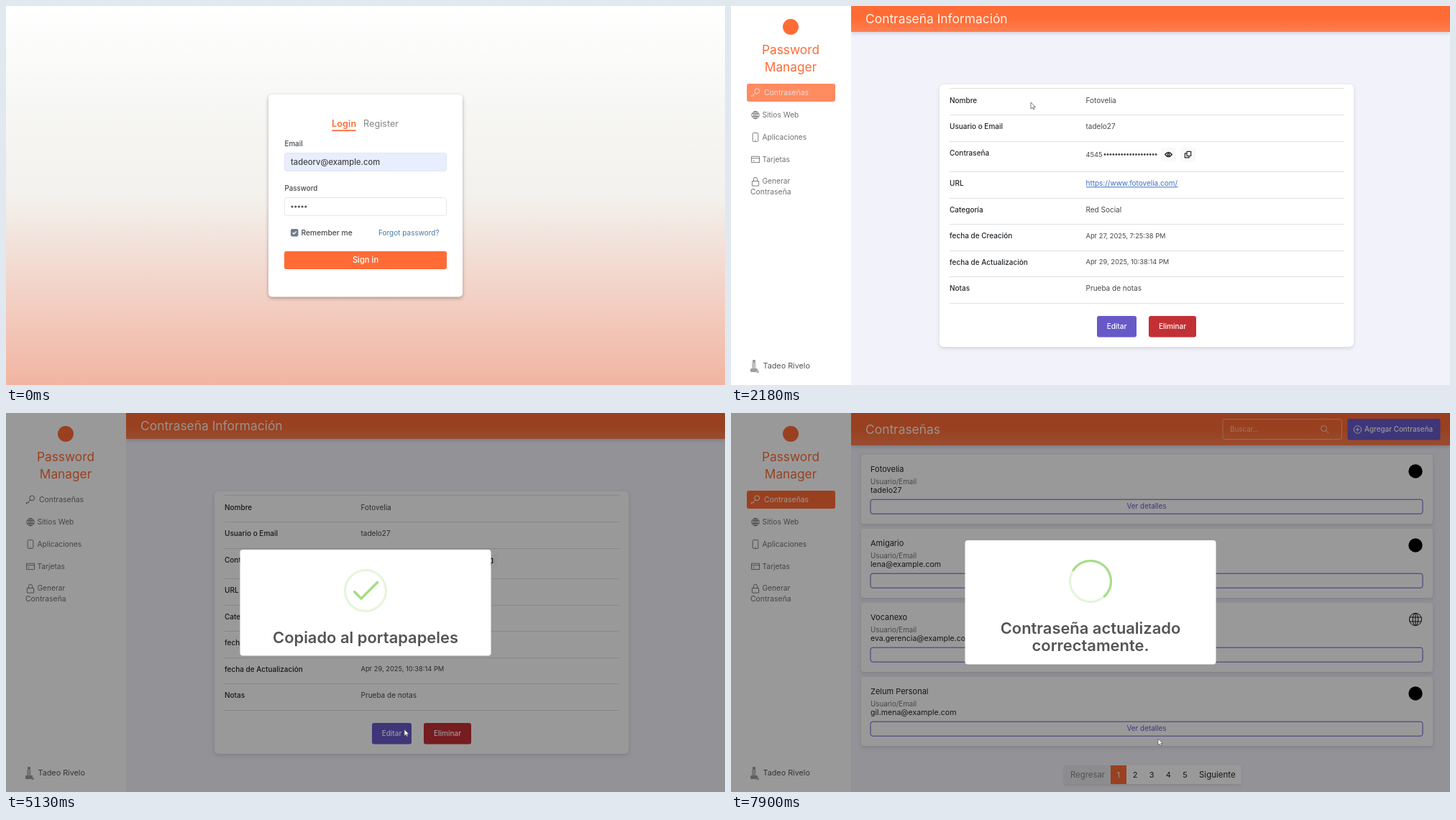
An HTML page with a canvas for the animation above (7990 ms loop, 1000 by 527 pixels).

```html
<!DOCTYPE html>
<html lang="es">
<head>
<meta charset="utf-8">
<title>Password Manager</title>
<style>
  html, body { margin: 0; width: 100%; height: 100%; overflow: hidden; background: #fff; }
  canvas { display: block; width: 100vw; height: 100vh; }
</style>
</head>
<body>
<canvas id="stage"></canvas>
<script>
const W = 1000, H = 527, LOOP = 7990;
const ORANGE = '#ff6b35', PURPLE = '#6759c8', RED = '#c23035', PAGE = '#f2f2fb';
const INK = '#212529', TEXT = '#45484d', MUTED = '#707070', GREEN = '165,220,134';

const SITE = 'Fotovelia', URL_TEXT = 'https://www.fotovelia.com/', USER = 'tadelo27';
const ACCOUNTS = [
  [SITE, USER],
  ['Amigario', 'lena@example.com'],
  ['Vocanexo', 'eva.gerencia@example.com'],
  ['Zelum Personal', 'gil.mena@example.com']
];

// Moments of the story, in ms
const AT = {
  cursor: 60, home: 710, loaded: 830, detail: 2090, reveal: 2940,
  copied: 4460, copiedEnd: 5290, edit: 5780, back: 7300, reloaded: 7390, saved: 7540
};

// Pointer stops: time, x, y
const STOPS = [
  [60, 520, 400], [400, 482, 345], [900, 482, 345], [1650, 417, 134], [2220, 417, 134],
  [2800, 608, 206], [3750, 608, 206], [4260, 671, 200], [4560, 671, 200], [5080, 554, 440],
  [5850, 554, 440], [6290, 546, 376], [6400, 546, 376], [7000, 594, 453]
];

const canvas = document.getElementById('stage');
const ctx = canvas.getContext('2d');
const dpr = window.devicePixelRatio || 1;
canvas.width = W * dpr;
canvas.height = H * dpr;

const clamp = v => Math.max(0, Math.min(1, v));
const ramp = (t, start, length) => clamp((t - start) / length);
const smooth = k => k * k * (3 - 2 * k);
const mix = (a, b, k) => a + (b - a) * k;

function box(x, y, w, h, r, fill, stroke, line = 1) {
  ctx.beginPath();
  ctx.roundRect(x, y, w, h, r);
  if (fill) { ctx.fillStyle = fill; ctx.fill(); }
  if (stroke) { ctx.strokeStyle = stroke; ctx.lineWidth = line; ctx.stroke(); }
}

function panel(x, y, w, h, r, shade = 'rgba(0,0,0,.13)', blur = 5) {
  ctx.save();
  ctx.shadowColor = shade;
  ctx.shadowBlur = blur * dpr;
  ctx.shadowOffsetY = 2 * dpr;
  box(x, y, w, h, r, '#fff');
  ctx.restore();
}

// y is the middle of the line of text
function text(str, x, y, size, color = TEXT, weight = 400, align = 'left') {
  ctx.font = `${weight} ${size}px Inter, "Noto Sans", sans-serif`;
  ctx.textAlign = align;
  ctx.fillStyle = color;
  ctx.fillText(str, x, y + size * 0.35);
}

function disc(x, y, r, fill) {
  ctx.beginPath();
  ctx.arc(x, y, r, 0, 7);
  ctx.fillStyle = fill;
  ctx.fill();
}

function dots(x, y, count, step, r, fill) {
  for (let i = 0; i < count; i++) disc(x + i * step, y, r, fill);
}

function button(x, y, w, h, label, fill, size = 10) {
  box(x, y, w, h, 3, fill);
  text(label, x + w / 2, y + h / 2, size, '#fff', 500, 'center');
}

function rule(x1, x2, y, color) {
  ctx.fillStyle = color;
  ctx.fillRect(x1, y, x2 - x1, 1);
}

function shade(height, ...stops) {
  const fill = ctx.createLinearGradient(0, 0, 0, height);
  stops.forEach(([at, color]) => fill.addColorStop(at, color));
  return fill;
}

const circlePath = (x, y, r, ry = r) =>
  `M${x - r} ${y}a${r} ${ry} 0 1 0 ${2 * r} 0a${r} ${ry} 0 1 0 ${-2 * r} 0`;

const ICONS = {
  key: circlePath(2.2, -2.2, 3.4) + 'M0 .4L-5.5 5.6V3.6M-3.4 3.6L-1.9 5',
  globe: circlePath(0, 0, 5.2) + circlePath(0, 0, 2.3, 5.2) + 'M-5 -1.8H5M-5 1.8H5M0 -5.2V5.2',
  phone: 'M-2.6 -6H2.6Q3.8 -6 3.8 -4.8V4.8Q3.8 6 2.6 6H-2.6Q-3.8 6 -3.8 4.8V-4.8Q-3.8 -6 -2.6 -6ZM-.7 4.2H.7',
  card: 'M-5.5 -4.2H5.5V4.2H-5.5ZM-5.5 -1.6H5.5M-3.6 1.8H-1.4',
  lock: 'M-4.6 -.8H4.6V5.8H-4.6ZM-2.6 -.8V-3.4A2.6 2.6 0 0 1 2.6 -3.4V-.8',
  search: circlePath(-1, -1, 4) + 'M2 2L5.5 5.5',
  plus: circlePath(0, 0, 5.2) + 'M-2.5 0H2.5M0 -2.5V2.5',
  eye: 'M-4.8 0Q0 -6.4 4.8 0Q0 6.4 -4.8 0Z' + circlePath(0, 0, 1.5),
  slash: 'M-4.5 -4L4.5 4',
  copy: 'M-1.5 -4.2H4.2V2H-1.5ZM-1.5 -1.6H-4.2V4.4H1.6V2',
  chevron: 'M-3.5 -1.8L0 1.8L3.5 -1.8',
  tick: 'M-2.6 0L-.8 1.8L2.6 -1.8',
  grip: 'M-2.5 2.5L2.5 -2.5M.3 2.5L2.5 .3'
};

function icon(name, x, y, color, line = 1, scale = 1) {
  ctx.save();
  ctx.translate(x, y);
  ctx.scale(scale, scale);
  ctx.strokeStyle = color;
  ctx.lineWidth = line;
  ctx.lineJoin = 'round';
  ctx.stroke(new Path2D(ICONS[name]));
  ctx.restore();
}

function pointerAt(t) {
  const next = STOPS.findIndex(s => s[0] > t);
  if (next < 0) return STOPS[STOPS.length - 1].slice(1);
  if (next === 0) return STOPS[0].slice(1);
  const a = STOPS[next - 1], b = STOPS[next];
  const k = smooth(ramp(t, a[0], b[0] - a[0]));
  return [mix(a[1], b[1], k), mix(a[2], b[2], k)];
}

let mouse = [0, 0], hot = false, covered = false;

function hover(x, y, w, h) {
  const on = !covered && mouse[0] >= x && mouse[0] <= x + w && mouse[1] >= y && mouse[1] <= y + h;
  if (on) hot = true;
  return on;
}

function login() {
  ctx.fillStyle = shade(H, [0, '#fff'], [0.25, '#f7f7f5'], [0.5, '#f3f1ed'], [1, '#f2b4a1']);
  ctx.fillRect(0, 0, W, H);

  panel(365, 123, 270, 281.5, 5, 'rgba(70,50,60,.4)', 5);
  text('Login', 453, 164, 12.8, ORANGE, 600);
  ctx.fillStyle = ORANGE;
  ctx.fillRect(453.5, 172.3, 33, 1.8);
  text('Register', 497, 164, 12.7, '#858585');

  text('Email', 387.5, 191.5, 9.8, TEXT, 500);
  box(387.5, 204.5, 225, 25, 3, '#e8eefe', '#dfe5f3');
  text('tadeorv@example.com', 396, 217, 11.2, '#444', 500);

  text('Password', 387.5, 253.5, 9.8, TEXT, 500);
  box(387.5, 266.5, 225, 25, 3, '#fff', '#e6e7ea');
  dots(398, 279, 5, 4.7, 1.6, '#555');

  box(396, 310, 10.5, 10.5, 2, '#6c7c90');
  icon('tick', 401.2, 315.2, '#fff', 1.3);
  text('Remember me', 410.5, 315.5, 10.3, TEXT, 500);
  text('Forgot password?', 518, 315.5, 10, '#4a78a6');

  hover(387, 341, 226, 25);
  button(387, 341, 226, 25, 'Sign in', ORANGE, 11.2);
}

function avatar() {
  box(30, 492, 4, 4, 1, '#9a9aa2');
  box(29, 496, 5.5, 10, 0, '#c4c0c4');
  box(27, 504, 10, 5, 1, '#a09da3');
  box(35, 507, 4, 3, 1, '#b5b3b9');
}

function shell(title, barHeight, active, named) {
  ctx.fillStyle = PAGE;
  ctx.fillRect(0, 0, W, H);
  ctx.save();
  ctx.shadowColor = 'rgba(90,90,120,.25)';
  ctx.shadowBlur = 5 * dpr;
  ctx.shadowOffsetY = 2 * dpr;
  ctx.fillStyle = shade(barHeight, [0, ORANGE], [0.5, ORANGE], [1, '#ff7f51']);
  ctx.fillRect(167, 0, W - 167, barHeight);
  ctx.restore();
  text(title, 187, barHeight > 40 ? 23 : 18, 17.4, '#fff3ec');

  ctx.fillStyle = '#fff';
  ctx.fillRect(0, 0, 167, H);
  disc(83, 29, 11, ORANGE);
  text('Password', 83, 60.5, 17.3, ORANGE, 400, 'center');
  text('Manager', 83, 85, 17.3, ORANGE, 400, 'center');

  if (active > 0) {
    ctx.globalAlpha = active;
    box(22, 108, 123, 25, 3, ORANGE);
    ctx.globalAlpha = 1;
  }
  const level = Math.round(mix(112, 255, active));
  const tone = `rgb(${level},${level},${level})`;
  icon('key', 34, 120.5, tone);
  text('Contraseñas', 46, 120.5, 10.4, tone);
  [['globe', 'Sitios Web'], ['phone', 'Aplicaciones'], ['card', 'Tarjetas'], ['lock', 'Generar']]
    .forEach(([glyph, label], i) => {
      const y = 151.2 + i * 30.9;
      icon(glyph, 34, y + 0.4, '#6a6a6a', 0.85);
      text(label, 43.5, y, 10.2, MUTED);
    });
  text('Contraseña', 27, 258.5, 10.4, MUTED);

  avatar();
  if (named) text('Tadeo Rivelo', 44.5, 500.5, 10.8, '#555');
}

function pager(left, pages) {
  const width = pages ? 247 : 134, first = pages ? 65 : 67;
  panel(left, 490, width, 26, 3, 'rgba(0,0,0,.08)', 3);
  box(left, 490, first, 26, [3, 0, 0, 3], '#e8e9ee');
  text('Regresar', left + first / 2 + 0.5, 503.3, 11.4, '#85878c', 400, 'center');
  if (pages) {
    ctx.fillStyle = ORANGE;
    ctx.fillRect(left + first, 490, 22, 26);
  }
  for (let i = 0; i < pages; i++) {
    text(String(i + 1), left + 75.8 + i * 23.2, 503.3, 11, i ? INK : '#fff', 400, 'center');
  }
  text('Siguiente', left + width - 33.7, 503.3, 11.5, INK, 400, 'center');
}

function list(active, loaded, named) {
  shell('Contraseñas', 45, active, named);
  box(684, 8.5, 165.5, 28, 3, null, 'rgba(255,255,255,.45)');
  text('Buscar...', 694, 23, 9.9, '#ffc9b3');
  icon('search', 825.5, 22.5, '#ffd9c9');
  box(857.5, 8, 129, 29.5, 3, PURPLE);
  icon('plus', 871.5, 23, '#fff');
  text('Agregar Contraseña', 881, 23, 9.9, '#fff', 500);

  if (!loaded) {
    box(180, 51, 796, 38, 4, '#fff');
    text('No tienes Datos Guardadas.', 191, 70.5, 11.5, INK);
    pager(519, 0);
    return;
  }
  ACCOUNTS.forEach(([name, user], i) => {
    const y = 58 + i * 103;
    panel(181, y, 795, 96, 4);
    text(name, 194, y + 20, 11, INK);
    text('Usuario/Email', 194, y + 38, 9.8, '#707478');
    text(user, 194, y + 49.5, 10.6, INK);
    const on = hover(194, y + 62, 768, 20);
    box(194, y + 62.2, 768, 20, 3, on ? PURPLE : '#fff', PURPLE);
    text('Ver detalles', 578, y + 72, 9.9, on ? '#fff' : PURPLE, 400, 'center');
    if (i === 2) icon('globe', 952, y + 23, '#111', 0.6, 1.65);
    else disc(952, y + 23, 9.7, '#000');
  });
  pager(463, 5);
}

function detail(t) {
  const shown = t >= AT.reveal;
  shell('Contraseña Información', 36, 1 - smooth(ramp(t, AT.detail, 300)), true);
  panel(290, 109, 576, 365, 6);
  [114, 151, 188, 230, 267, 303, 340, 376, 413].forEach(y => rule(304, 853, y, '#dfe0e4'));

  const rows = [
    ['Nombre', SITE, 131], ['Usuario o Email', USER, 167.5], ['Contraseña', '', 204.5],
    ['URL', URL_TEXT, 246.3], ['Categoría', 'Red Social', 283],
    ['fecha de Creación', 'Apr 27, 2025, 7:25:38 PM', 319.3],
    ['fecha de Actualización', 'Apr 29, 2025, 10:38:14 PM', 356],
    ['Notas', 'Prueba de notas', 392.8]
  ];
  rows.forEach(([label, value, y]) => {
    text(label, 304, y, 10, INK, 500);
    const link = value === URL_TEXT, date = value.startsWith('Apr');
    text(value, 493.5, y, date ? 9.3 : 10, link ? '#3a6fc4' : TEXT);
    if (link) rule(494, 494 + ctx.measureText(value).width, y + 5, '#3a6fc4');
  });

  text(shown ? '45454545454545675676767' : '4545', 493.5, 206.5, 9.3, TEXT);
  if (!shown) dots(520, 206.5, 19, 3.95, 1.4, TEXT);

  const eyeX = shown ? 645.5 : 608.5, copyX = shown ? 672.5 : 635.5;
  [eyeX, copyX].forEach(x => {
    const on = hover(x - 10.5, 196.5, 21, 20);
    box(x - 10.5, 196.5, 21, 20, 3, on ? '#c6c6c8' : '#f9f9fa');
  });
  icon('eye', eyeX, 206.5, INK, 1.3);
  if (shown) icon('slash', eyeX, 206.5, INK, 1.4);
  icon('copy', copyX, 206.5, INK, 1.2);
  if (shown && hover(copyX - 10.5, 196.5, 21, 20)) {
    box(653.5, 176.5, 38.5, 17.5, 3, ORANGE);
    text('Copiar', 672.8, 185.3, 8.9, '#fff', 500, 'center');
  }

  hover(509, 431, 55, 30);
  button(509, 431, 55, 29.5, 'Editar', PURPLE);
  button(581, 431, 66, 29.5, 'Eliminar', RED);
}

function edit() {
  shell('Editar Contraseña', 36, 0, true);
  panel(290, 65.5, 576, 412, 6);
  const labels = ['Nombre', 'URL', 'Usuario / Email', 'Clave', 'Notas (opcional)'];
  const values = [SITE, URL_TEXT, USER, ''];
  labels.forEach((label, i) => text(label, 304, 86.3 + i * 54.1, 10.2, INK));
  values.forEach((value, i) => {
    const y = 99 + i * 54.1;
    box(304, y, 548.5, 23, 3, '#fff', '#e1e3e7');
    text(value, 312, y + 11.7, 10.2, INK);
  });
  dots(314, 273, 23, 3.98, 1.3, INK);
  box(304, 315.5, 548.5, 41.5, 3, '#fff', '#e1e3e7');
  text('Prueba de notas', 312, 328.5, 11.5, INK);
  icon('grip', 848.5, 353.5, '#666', 0.9);
  text('Categoría', 304, 375.3, 10.2, INK);
  box(304, 388.5, 548.5, 22.5, 3, '#fff', '#e1e3e7');
  text('Red Social', 312, 399.8, 10, INK);
  icon('chevron', 838, 399.8, '#444', 1.3);
  hover(496, 434, 72, 30);
  hover(584, 434, 75, 30);
  button(496, 434, 72, 30, 'Regresar', PURPLE);
  button(584, 434, 75, 30, 'Actualizar', ORANGE);
}

// Bounce used when the dialog opens
function popScale(k) {
  if (k < 0.45) return mix(0.7, 1.05, smooth(k / 0.45));
  if (k < 0.8) return mix(1.05, 0.95, smooth((k - 0.45) / 0.35));
  return mix(0.95, 1, smooth((k - 0.8) / 0.2));
}

function ring(y, from, to, alpha) {
  ctx.beginPath();
  ctx.arc(500, y, 28.5, from * Math.PI / 180, to * Math.PI / 180);
  ctx.strokeStyle = `rgba(${GREEN},${alpha})`;
  ctx.lineWidth = 3;
  ctx.stroke();
}

function successMark(y, age) {
  ring(y, 0, 360, 0.3);
  // The bright arc grows backwards from 50 to -150 degrees, then shrinks into its far end
  const turn = 400 * ramp(age, 212, 298);
  if (turn > 0 && turn < 400) ring(y, Math.max(-150, 50 - turn), Math.min(50, 250 - turn), 1);

  const a = ramp(age, 405, 110), b = ramp(age, 500, 140);
  if (a <= 0) return;
  ctx.beginPath();
  ctx.moveTo(484.5, y + 1.5);
  ctx.lineTo(484.5 + 9.5 * a, y + 1.5 + 9.5 * a);
  if (b > 0) ctx.lineTo(494 + 22.5 * b, y + 11 - 22.5 * b);
  ctx.strokeStyle = `rgb(${GREEN})`;
  ctx.lineWidth = 3.4;
  ctx.lineCap = 'round';
  ctx.stroke();
  ctx.lineCap = 'butt';
}

function dialog(t, open, close, top, height, lines) {
  const out = ramp(t, close, 150);
  if (t < open || out >= 1) return;
  const age = t - open;
  ctx.fillStyle = `rgba(0,0,0,${0.4 * ramp(age, 0, 100) * (1 - out)})`;
  ctx.fillRect(0, 0, W, H);

  const scale = out > 0 ? 1 - out / 2 : popScale(ramp(age, 0, 300));
  const mid = top + height / 2;
  ctx.save();
  ctx.globalAlpha = 1 - out;
  ctx.translate(500, mid);
  ctx.scale(scale, scale);
  ctx.translate(-500, -mid);
  box(325.5, top, 349, height, 4, '#fff');
  successMark(top + 57, age);
  lines.forEach((line, i) => text(line, 500, top + 122 + i * 24.7, 21.9, '#545454', 600, 'center'));
  ctx.restore();
}

const ARROW = new Path2D('M0 0V11.2L2.6 8.8L4.3 12.4L6.1 11.6L4.5 8.1H8Z');
const HAND = new Path2D('M-1.2 .6Q0 -.8 1.2 .6V5Q2.6 4.2 3.4 5.2Q4.8 4.6 5.4 5.8Q7 5.4 7.2 7V10.5L5.8 14H-.6L-4.2 9Q-4 7.4 -2.6 8L-1.2 9.2Z');

function pointer() {
  const shape = hot ? HAND : ARROW;
  ctx.save();
  ctx.translate(mouse[0], mouse[1]);
  ctx.scale(0.8, 0.8);
  ctx.fillStyle = '#fff';
  ctx.strokeStyle = '#5a5a62';
  ctx.lineWidth = 1;
  ctx.lineJoin = 'round';
  ctx.fill(shape);
  ctx.stroke(shape);
  ctx.restore();
}

function draw(t) {
  ctx.setTransform(dpr, 0, 0, dpr, 0, 0);
  mouse = pointerAt(t);
  hot = false;
  covered = t < AT.cursor || (t >= AT.copied && t < AT.copiedEnd + 150) || t >= AT.saved;

  if (t < AT.home) login();
  else if (t < AT.detail) list(smooth(ramp(t, AT.home, 300)), t >= AT.loaded, t >= AT.loaded);
  else if (t < AT.edit) detail(t);
  else if (t < AT.back) edit();
  else list(smooth(ramp(t, AT.back, 300)), t >= AT.reloaded, true);

  dialog(t, AT.copied, AT.copiedEnd, 190, 147.5, ['Copiado al portapapeles']);
  dialog(t, AT.saved, LOOP, 177, 172.5, ['Contraseña actualizado', 'correctamente.']);
  if (t >= AT.cursor) pointer();
}

const start = performance.now();
function tick(now) {
  draw(Math.max(0, now - start) % LOOP);
  requestAnimationFrame(tick);
}
draw(0);
requestAnimationFrame(tick);
</script>
</body>
</html>
```
